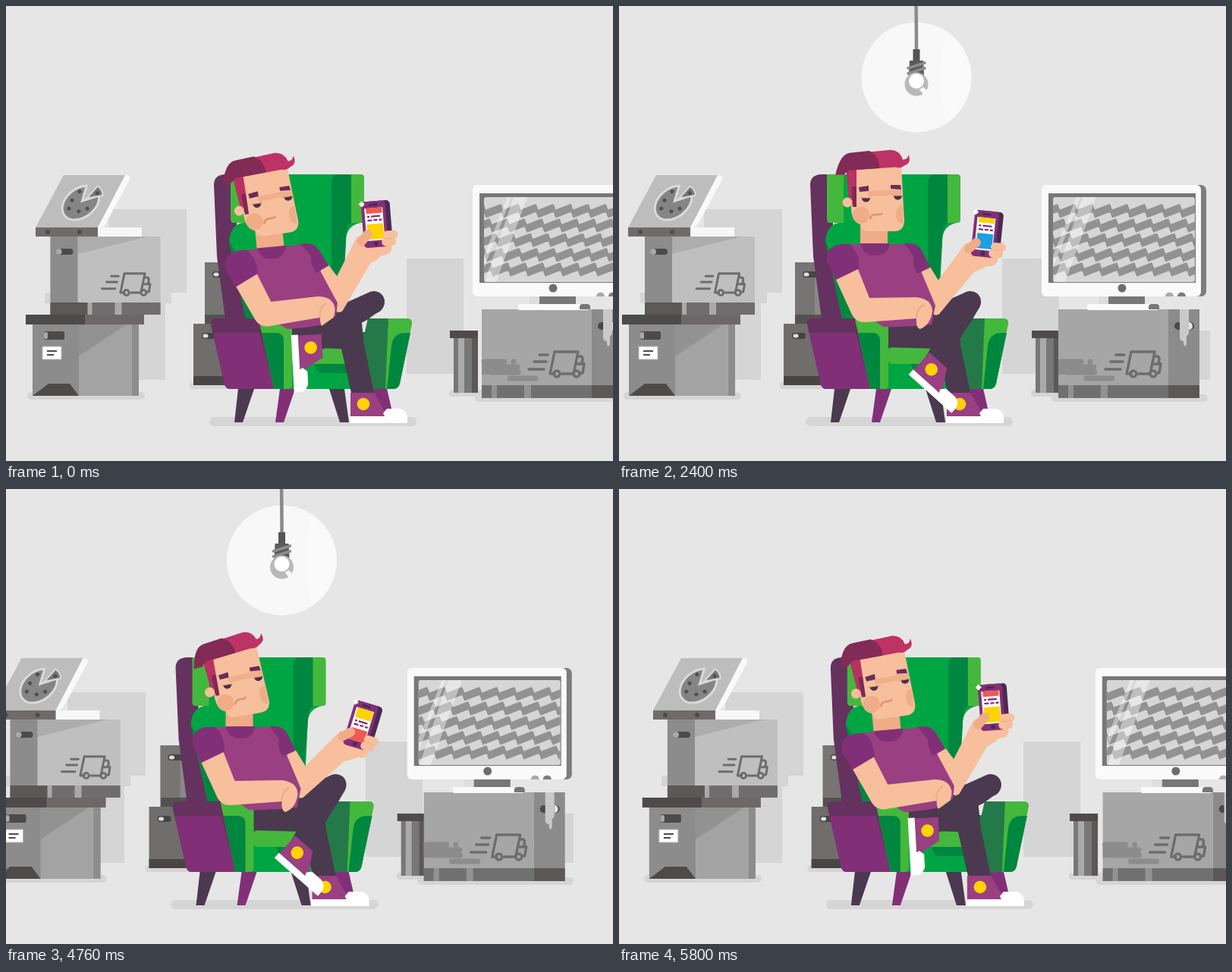
Write an HTML page that moves like this. It is 800 by 600 pixels and loops after 5.84 s.

```html
<!DOCTYPE html>
<html lang="en">
<head>
<meta charset="utf-8">
<title>Waiting for deliveries</title>
<style>
html, body { margin: 0; width: 100%; height: 100%; overflow: hidden; background: #e6e6e6; }
svg { display: block; width: 100vw; height: 100vh; }
.shade { fill: #d5d5d5; }
.skin { fill: #f7bf9c; }
.blush { fill: #f0ab87; }
.shirt { fill: #9a3f82; }
.plum { fill: #813078; }
.grape { fill: #65315f; }
.pants { fill: #4a394f; }
.pantsLine { stroke: #4a394f; stroke-linecap: round; fill: none; }
.leaf { fill: #44b83c; }
.green { fill: #00a543; }
.moss { fill: #00873f; }
.dark { fill: #5c5858; }
.mid { fill: #8c8c8c; }
.ink { fill: none; stroke: #6d6d6d; stroke-width: 3.4; stroke-linecap: round; stroke-linejoin: round; }
</style>
</head>
<body>
<svg viewBox="0 0 800 600" preserveAspectRatio="none">
<defs>
  <clipPath id="tvClip"><rect x="572" y="252" width="187" height="112" rx="2"/></clipPath>
  <clipPath id="phoneClip"><rect x="-12" y="-21" width="24" height="43"/></clipPath>
  <g id="truck" class="ink">
    <path d="M34 2H65L59 31H44M34 31H28L34 2M65 8H68Q71 8 71 12L70 16L73 18L71 30H68M62 18H70M14 6H25M7 15H23M0 25H20"/>
    <circle cx="37" cy="31" r="4"/><circle cx="63" cy="31" r="4"/>
  </g>
  <g id="shoe">
    <path class="shirt" d="M-17-15H14L32 16H-17Z"/>
    <path fill="#fff" d="M-18 16H28L26 12L31 6H48Q56 8 58 16V25H-18Z"/>
    <circle r="8.3" fill="#ffd200"/>
  </g>
</defs>
<rect width="800" height="600" fill="#e6e6e6"/>

<g id="backdrop">
  <path class="shade" d="M505 333H580V485H505ZM765 428H779V493H765Z"/>
  <path class="shade" d="M112 268H215V378H195V392H187V493H120V392H28V378H112Z"/>
</g>

<g id="lowBox">
  <rect class="shade" x="6" y="509" width="155" height="10" rx="5"/>
  <rect x="13" y="420" width="140" height="94" fill="#a3a3a3"/>
  <rect class="mid" x="13" y="420" width="61" height="94"/>
  <path fill="#929292" d="M74 420H137L74 462Z"/>
  <rect class="mid" x="144" y="420" width="9" height="94"/>
  <rect x="4" y="407" width="156" height="13" fill="#6c6868"/>
  <rect x="4" y="407" width="78" height="13" fill="#4d4a4a"/>
  <path fill="#4d4a4a" d="M13 514L34 498H62L74 514Z"/>
  <rect x="28" y="429" width="27" height="11" rx="2" fill="#4d4a4a"/>
  <rect x="28" y="430" width="5" height="9" rx="2" fill="#a8a8a8"/>
  <rect x="26" y="449" width="25" height="17" fill="#fff" stroke="#b5b5b5"/>
  <path d="M32 455H45M32 460H41" stroke="#4d4a4a" stroke-width="2"/>
</g>

<g id="highBox">
  <rect x="34" y="304" width="145" height="103" fill="#bfbfbf"/>
  <path fill="#adadad" d="M70 304H162L70 327Z"/>
  <rect class="mid" x="34" y="304" width="36" height="103"/>
  <rect x="70" y="391" width="109" height="16" fill="#a9a9a9"/>
  <path fill="#6f6d6d" d="M89 391H119V407H89ZM128 391H179V407H128Z"/>
  <path class="dark" d="M34 391H83V407H34Z"/>
  <rect x="41" y="320" width="23" height="8" rx="4" fill="#4d4a4a"/>
  <rect x="41" y="320" width="8" height="8" rx="4" fill="#a8a8a8"/>
  <use href="#truck" transform="translate(102 351) scale(.87)"/>
</g>

<g id="pizza">
  <rect x="90" y="292" width="62" height="12" fill="#f7f7f7"/>
  <path fill="#f9f9f9" d="M122 223H132Q137 224 136 229L104 288L92 296Z"/>
  <path fill="#bdbdbd" d="M12 292L49 223H130L94 292Z"/>
  <rect x="12" y="292" width="82" height="12" fill="#6f6b6b"/>
  <path fill="#4d4a4a" d="M25 298a3 3 0 1 0 6 0a3 3 0 1 0-6 0M67 298a3 3 0 1 0 6 0a3 3 0 1 0-6 0"/>
  <g transform="translate(71 259) rotate(-38)">
    <path fill="#858585" stroke="#dadada" stroke-width="3" d="M3 0L25 8A27 19 0 1 1 20-12Z"/>
    <path fill="#777" stroke="#dadada" stroke-width="2" d="M10 1L31-3Q34 5 29 11Z"/>
    <path d="M-17-3h.1M-9 8h.1M-7-9h.1M2 12h.1M8-12h.1M25 4h.1" stroke="#505050" stroke-width="5" stroke-linecap="round"/>
  </g>
</g>

<g id="behind">
  <rect class="shade" x="212" y="496" width="60" height="9" rx="4"/>
  <rect x="232" y="338" width="42" height="69" fill="#8b8888"/>
  <rect x="232" y="338" width="26" height="69" fill="#777474"/>
  <rect x="232" y="407" width="42" height="12" fill="#545050"/>
  <rect x="217" y="419" width="60" height="81" fill="#706d6d"/>
  <rect x="217" y="488" width="60" height="12" fill="#494545"/>
  <path stroke="#444" stroke-width="8" stroke-linecap="round" d="M246 354H260M232 435H242"/>
  <path stroke="#ddd" stroke-width="5" stroke-linecap="round" d="M246 354H248M232 435H234"/>
</g>

<g id="table">
  <rect class="shade" x="543" y="506" width="50" height="9" rx="4"/>
  <rect x="549" y="438" width="30" height="72" fill="#777"/>
  <rect x="555" y="438" width="8" height="72" fill="#aaa"/>
  <rect x="573" y="432" width="8" height="78" class="dark"/>
  <rect x="544" y="428" width="37" height="10" fill="#4f4b4b"/>
</g>

<g id="box">
  <rect class="shade" x="570" y="512" width="206" height="10" rx="5"/>
  <rect x="579" y="400" width="145" height="117" fill="#a6a6a6"/>
  <rect x="724" y="400" width="41" height="117" fill="#8b8b8b"/>
  <rect x="579" y="500" width="145" height="17" fill="#707070"/>
  <rect x="724" y="500" width="41" height="17" class="dark"/>
  <path fill="#929292" d="M592 500h7v17h-7ZM635 500h9v17h-9Z"/>
  <path fill="none" stroke="#8c8c8c" stroke-width="7" stroke-linecap="round" d="M582 469H609M621 469h.1M602 476H626M591 483H627M616 491H650"/>
  <path fill="#8c8c8c" d="M579 466H604V486H579Z"/>
  <use href="#truck" transform="translate(641 454)"/>
  <rect x="732" y="417" width="26" height="10" rx="5" fill="#484848"/>
  <path fill="#e6e6e6" d="M751 417a5 5 0 0 1 0 10Z"/>
  <path fill="#c9c9c9" d="M739 400H751V430Q751 434 748 435V446Q746 451 744 446V442Q739 442 739 436Z"/>
</g>

<g id="tv">
  <rect x="565" y="236" width="209" height="147" rx="7" fill="#7d7d7d"/>
  <rect x="557" y="236" width="210" height="147" rx="6" fill="#fafafa"/>
  <rect x="566" y="247" width="194" height="118" fill="#777"/>
  <rect x="572" y="252" width="187" height="112" rx="3" fill="#d6d6d6"/>
  <g clip-path="url(#tvClip)">
    <g id="waves" fill="#929292"></g>
    <path fill="#fff" opacity=".4" d="M611 252H629L588 364H573ZM603 252H608L572 346V329Z"/>
  </g>
  <circle cx="663" cy="372" r="5.5" fill="#6d6d6d"/>
  <path fill="#aaa" d="M720 383a5.5 5.5 0 0 1 11 0Z"/>
  <path fill="#7d7d7d" d="M736 383a5.5 5.5 0 0 1 11 0Z"/>
  <rect x="632" y="383" width="14" height="10" fill="#ddd"/>
  <rect x="645" y="383" width="48" height="10" fill="#777"/>
  <rect x="617" y="393" width="94" height="8" rx="2" fill="#fafafa"/>
  <path fill="#777" d="M698 400V397Q698 393 702 393H708Q712 393 712 397V400Z"/>
</g>

<g id="chair">
  <rect class="shade" x="246" y="542" width="273" height="12" rx="6"/>
  <path class="pants" d="M284 505H305L290 549H279ZM404 505H424L430 549H418Z"/>
  <path class="plum" d="M339 505H359L344 549H333ZM460 500H479L487 535H467Z"/>
  <path class="grape" d="M252 236Q252 222 268 222H282V300L315 420H268L256 330Z"/>
  <path class="green" d="M290 222H445V286Q426 290 426 310L420 440H300L272 310Q274 288 290 286Z"/>
  <path class="moss" d="M272 310L330 420H296ZM412 222H433V286Q426 290 426 312L418 410L407 380V235Q407 226 412 222Z"/>
  <path class="leaf" d="M274 222H296V286H278Q274 286 274 281ZM433 222H446Q450 222 450 226V282Q450 286 446 286H433Z"/>
  <rect class="moss" x="345" y="430" width="120" height="42"/>
  <rect class="green" x="345" y="470" width="135" height="35"/>
  <path class="moss" d="M385 472H440L432 484H392Q386 480 385 472Z"/>
  <rect class="leaf" x="353" y="450" width="85" height="22" rx="8"/>
  <path fill="#237a48" d="M455 412H486L479 505H458L447 447Z"/>
  <path class="leaf" d="M482 412H508Q514 413 513 419L497 498Q495 505 489 505H478Z"/>
  <path class="moss" d="M511 431L497 498Q495 505 489 505H480L486 448Q488 431 505 431Z"/>

  <path class="pantsLine" stroke-width="29" d="M375 430L462 391"/>
  <path class="pants" d="M352 416L400 412L445 400L450 447L463 510H433L420 452L352 450Z"/>
  <use href="#shoe" x="449" y="525"/>

  <path class="grape" d="M254 412H315L334 505H273Q268 505 266 499L248 420Q247 413 254 412Z"/>
  <path class="plum" d="M251 431H312L331 505H273Q268 505 266 499Z"/>
  <path class="leaf" d="M311 413H349Q355 413 355 419V499Q355 505 349 505H331L315 431Z"/>
  <path class="moss" d="M315 431H334Q344 431 344 441V505H331Z"/>

  <g id="body">
    <path class="skin" d="M393 350L410 344L431 378L416 407L405 380Z"/>
    <g id="arm">
      <path class="skin" d="M410 378L468 319L492 322L496 350Q488 356 474 358L420 407Q412 410 408 398Z"/>
      <g id="phone">
        <rect class="skin" x="-24" y="22" width="44" height="20" rx="9"/>
        <rect x="-10" y="-30" width="32" height="58" rx="5" fill="#4b2a52"/>
        <rect class="plum" x="-16" y="-30" width="32" height="61" rx="5"/>
        <rect x="-12" y="-21" width="24" height="43" fill="#fff"/>
        <g clip-path="url(#phoneClip)"><g id="feed"></g></g>
        <rect x="-6" y="-27" width="12" height="3" rx="1.5" fill="#4b2a52"/>
        <circle cy="26.5" r="2.8" fill="#4b2a52"/>
        <path fill="#fff" d="M-15-31L-11-27L-15-23L-19-27Z"/>
        <path stroke="#f0ab87" stroke-width="12" stroke-linecap="round" d="M-19 22L-10 13"/>
        <path stroke="#f7bf9c" stroke-width="11" stroke-linecap="round" d="M15 16H24M13 25H21"/>
        <path stroke="#f0ab87" d="M13 20.5H25"/>
      </g>
    </g>
    <path class="blush" d="M318 285H354V322H318Z"/>
    <path class="shirt" d="M288 314H384Q396 330 399 352L417 395L412 420Q380 424 348 423L330 410L300 350Z"/>
    <path class="plum" d="M318 313H357Q354 329 338 329Q322 329 318 313ZM376 313Q394 311 400 324L410 345L393 353Q386 342 388 330Z"/>
    <path class="plum" d="M304 314Q272 312 274 336L286 362L316 347Q318 326 304 314Z"/>
    <path class="skin" d="M286 361L315 347L330 385L392 384Q412 386 413 402Q411 420 397 426Q391 425 392 412L324 417Q312 417 307 407Z"/>
    <path fill="none" stroke="#f0ab87" stroke-width="2" d="M392 412Q392 398 402 394"/>
    <g id="head">
      <path class="skin" d="M309 212L372 209L376 284Q375 297 363 297H327Q319 296 318 288Q306 284 306 266Z"/>
      <circle class="blush" cx="319" cy="276" r="11"/>
      <path class="blush" d="M374 263V287Q365 286 365 275T374 263Z"/>
      <path fill="#b93062" d="M299 214H313V238L309 264L303 255Z"/>
      <path fill="#7d2a55" d="M307 238H313V265H308Z"/>
      <circle class="skin" cx="301" cy="259" r="6.5"/>
      <path fill="#eeaf8a" d="M328 244L373 242V249L328 251Z"/>
      <path fill="#6b2b5d" d="M316 239L329 237V244L317 245ZM358 236H371L372 242L358 241Z"/>
      <path fill="#49304f" d="M320 253H331a5.5 5.5 0 0 1-11 0ZM362 250H373a5.5 5.5 0 0 1-11 0Z"/>
      <path d="M318 253H333M360 250H374" stroke="#d89878" stroke-width="1"/>
      <path fill="none" stroke="#dd936f" stroke-width="2.5" d="M331 281Q332 275 338 275H342Q346 275 347 273"/>
      <g id="hair">
        <path fill="#be3365" d="M300 195L358 190Q371 191 374 203Q380 204 382 197Q386 208 376 211Q372 215 364 213L310 216Z"/>
        <path fill="#812b56" d="M285 222Q292 193 306 193L330 191Q344 198 343 214L303 216L296 222Z"/>
      </g>
    </g>
  </g>
  <g id="shin">
    <path class="pantsLine" stroke-width="28" d="M463 390V412"/>
    <path class="pants" d="M449 390H477L474 482H448Z"/>
    <use id="foot" href="#shoe"/>
  </g>
</g>

<g id="lamp">
  <g id="glow">
    <circle cy="37" r="72.5" fill="#f8f8f8"/>
    <path fill="#fafafa" d="M40-22A72 72 0 0 1 40 96Q22 37 40-22Z"/>
  </g>
  <path id="cord" fill="none" stroke="#8a8a8a" stroke-width="4.5"/>
  <g id="bulb">
    <rect x="-4.5" width="9" height="17" fill="#555"/>
    <path fill="#5b5b5b" d="M-9 15H9L10 34H-10Z"/>
    <path d="M-11 25L11 18M-11 32L11 25" stroke="#8c8c8c" stroke-width="3.5" stroke-linecap="round"/>
    <circle cy="46" r="15.5" fill="#b9b9b9"/>
    <circle cy="42" r="10" fill="#fff"/>
    <path fill="#f8f8f8" d="M4 53L9 50L17 57L12 63Z"/>
  </g>
</g>
</svg>
<script>
const LOOP = 5840, STEP = 40, WRAP = 5140;
const $ = id => document.getElementById(id);
const move = (id, value) => $(id).setAttribute("transform", value);

// Eased interpolation through [time, value] stops.
function track(t, stops) {
  if (t <= stops[0][0]) return stops[0][1];
  for (let i = 1; i < stops.length; i++) {
    const [t0, a] = stops[i - 1], [t1, b] = stops[i];
    if (t < t1) return a + (b - a) * (1 - Math.cos(Math.PI * (t - t0) / (t1 - t0))) / 2;
  }
  return stops[stops.length - 1][1];
}

// Per layer: distance still to travel at time zero, and relative exit speed.
const layers = {
  backdrop: [23, 1.087], lowBox: [22, 1], highBox: [24.5, 1], pizza: [27, 1], behind: [30, 1],
  table: [41, .995], box: [48, .995], tv: [58, .993], chair: [22, 1]
};
const motion = {
  body: [[-150, -5], [0, -5.5], [520, 0]],
  head: [[0, -3], [560, 0], [2450, 0], [2750, -3], [3000, 0], [3220, 0], [3560, -10]],
  hair: [[0, 1], [350, 4], [680, -4.5], [1000, 1], [1640, -2.5], [2200, -1], [3200, 0.5], [3420, 4], [3700, -3.5]],
  arm: [[0, -12], [680, -8], [1640, -10], [2500, -8], [3200, -3.5], [4320, 0], [5040, 1]],
  shin: [[0, 54], [200, 52], [620, -8], [1120, 36], [1550, 29.5], [2100, 30.2], [2700, 29.5], [3400, 30], [4100, 29.5]],
  scroll: [[0, .38], [300, .38], [620, 2.35], [1150, 2.35], [1550, 4.32], [2350, 4.32], [2800, 6.41], [3500, 6.41], [3950, 8.2]]
};

const WAVE = 23, TEETH = 11;
for (let row = 0; row < 5; row++) {
  const edge = "l18-7q3-1 3 2l2 5".repeat(TEETH), back = "l-2-5q0-3-3-2l-18 7".repeat(TEETH);
  $("waves").innerHTML += `<path d="M540 ${268.5 + row * 19.3}${edge}v11${back}z"/>`;
}

const colors = { R: "#f05a50", Y: "#ffd200", B: "#1ba0e1" };
[..."RYBRYBYRYRY"].forEach((c, i) => {
  const y = i * 34 - 21;
  $("feed").innerHTML += `<rect x="-10" y="${y}" width="21" height="20" fill="${colors[c]}"/>
    <path d="M-9 ${y + 24}h3m2 0h12M-9 ${y + 29}h6m2 0h5m2 0h4" stroke="#813078" stroke-width="2.3"/>`;
});

function lampPose(t, exit) {
  const shift = exit ? -exit : 620 * Math.exp(-t / 120);
  const fade = Math.max(0, (2400 - t) / 1720);
  const deg = t < 680 ? 33 : 33 * fade ** 1.4 * Math.cos(2 * Math.PI * (t - 680) / 960);
  const rad = Math.PI / 180, tilt = deg * (1 + .017 * Math.abs(deg));
  const x = 392 + 57 * Math.sin(deg * .72 * rad);
  const y = 57 - Math.abs(deg) * .07;
  const pose = `translate(${x} ${y}) rotate(${-tilt})`;
  move("lamp", `translate(${shift} 0)`);
  move("glow", pose);
  move("bulb", pose);
  const cx = x - 26 * Math.sin(tilt * rad), cy = y - 26 * Math.cos(tilt * rad);
  $("cord").setAttribute("d", `M391.5-4Q${cx} ${cy} ${x} ${y}`);
}

function draw(time) {
  const t = time >= WRAP ? time - LOOP : time;
  const exit = 404 * (Math.max(0, t - 4360) / 680) ** 5;
  for (const id in layers) {
    const [lag, speed] = layers[id];
    move(id, `translate(${exit ? -exit * speed : lag * Math.exp(-t / 200)} 0)`);
  }
  const pose = name => track(t, motion[name]);
  const arm = pose("arm"), shin = pose("shin");
  move("body", `rotate(${pose("body")} 380 415)`);
  move("head", `rotate(${pose("head")} 351 286)`);
  move("hair", `rotate(${pose("hair")} 335 214)`);
  move("arm", `rotate(${arm} 418 395)`);
  move("phone", `translate(495 310) rotate(${16 + arm / 4})`);
  move("shin", `rotate(${shin} 463 390)`);
  move("foot", `translate(463 493) rotate(${shin * .87 - 14})`);
  move("feed", `translate(0 ${-34 * pose("scroll")})`);
  [...$("waves").children].forEach((wave, i) => {
    const phase = (time / LOOP * 8 + i * .35) % 1;
    wave.setAttribute("transform", `translate(${phase * WAVE - WAVE / 2} 0)`);
  });
  lampPose(t, exit);
}

function tick() {
  const time = performance.now() % LOOP;
  draw(Math.floor(time / STEP) * STEP);
  requestAnimationFrame(tick);
}
tick();
</script>
</body>
</html>
```
